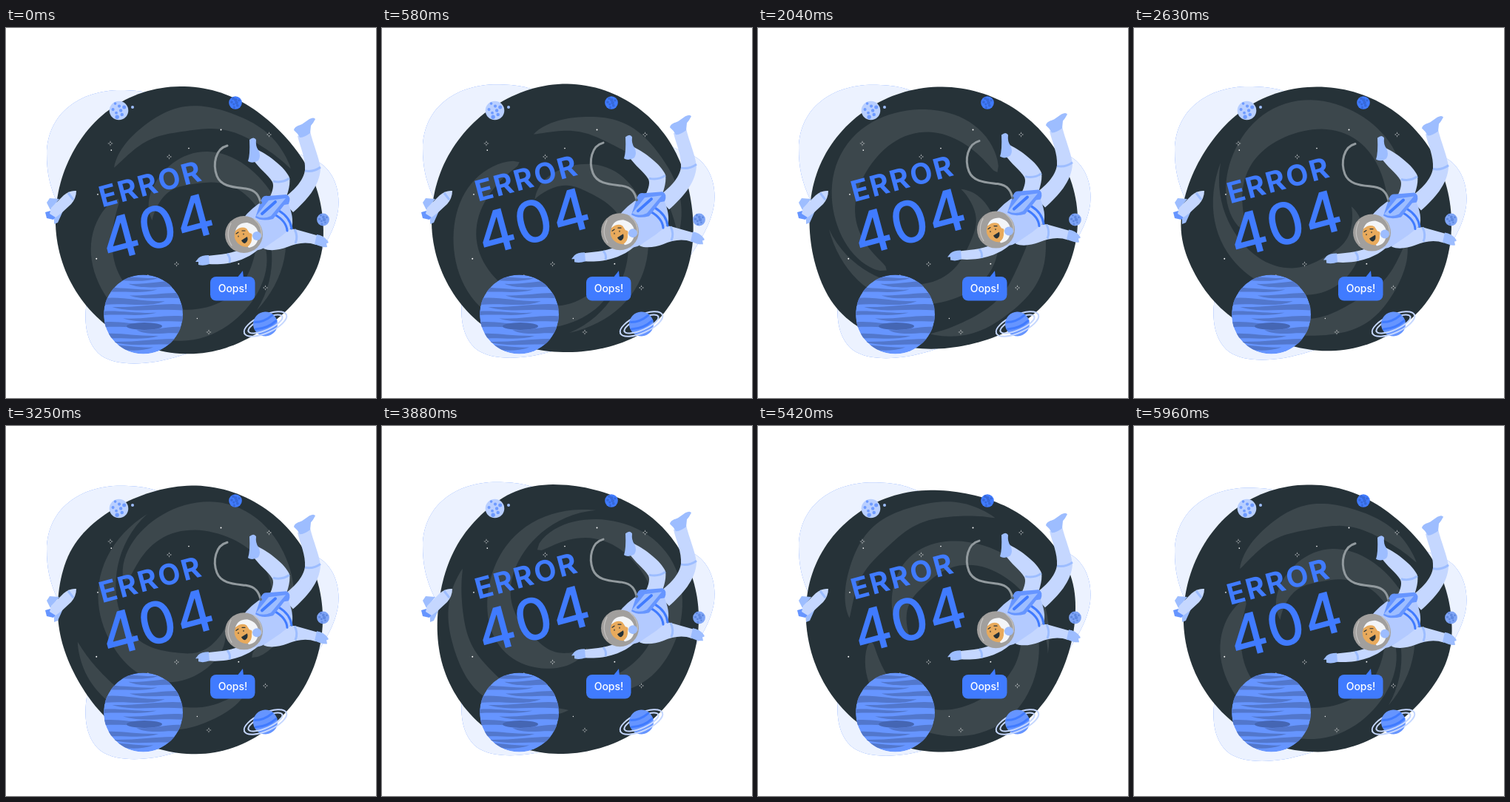
These frames come from a looping animation (500x500 px, 6000 ms). An HTML page:

```html
<!DOCTYPE html>
<html lang="en">
<head>
<meta charset="utf-8">
<title>Error 404</title>
<style>
html, body { margin: 0; width: 100%; height: 100%; overflow: hidden; background: #fff; }
svg { display: block; width: 100vw; height: 100vh; }
text { font-family: Inter, "Open Sans", sans-serif; text-anchor: middle; }
.blue { fill: #407bff; }
.mid { fill: #9dbdff; }
.soft { fill: #b3caff; }
.pale { fill: #c5d7ff; }
.line { fill: none; stroke-linecap: round; }
.band { fill: none; stroke: #9dbdff; stroke-width: 3; }
</style>
</head>
<body>
<svg viewBox="0 0 500 500">
  <defs>
    <path id="cloud" d="M55 170C56 115 100 84 155 84C185 84 198 88 215 95C290 128 370 160 418 179C443 190 452 220 449 245C444 280 420 310 400 340C360 390 290 425 235 443C190 457 150 457 129 443C105 425 106 390 109 370C112 330 85 270 70 238C59 214 55 195 55 170Z"/>
    <clipPath id="disc"><circle cx="185.5" cy="387" r="53.5"/></clipPath>
  </defs>

  <g id="backdrop">
    <use href="#cloud" class="blue"/>
    <use href="#cloud" fill="#fff" opacity=".9"/>
  </g>

  <g id="space">
    <path id="hole" fill="#263238"/>
    <path id="swirls" fill="#fff" opacity=".1"/>
  </g>

  <path id="stars" fill="#fff"/>

  <!-- banded planet -->
  <g clip-path="url(#disc)">
    <circle cx="185.5" cy="387" r="53.5" fill="#6695ff"/>
    <path id="stripes" fill="#5277cc"/>
    <ellipse cx="187" cy="403" rx="24" ry="5" fill="#4566b3"/>
  </g>

  <g id="moons"></g>

  <!-- ringed planet -->
  <g transform="translate(350.5 400) rotate(-24)">
    <g class="line" stroke="#c5d7ff" stroke-width="2">
      <path d="M-31 0A31 12 0 0 1 31 0M-25 0A25 8 0 0 1 25 0"/>
      <circle r="16.5" fill="#6695ff" stroke="none"/>
      <path stroke="#407bff" stroke-width="3" d="M-12 -8Q0 -3 13 -7M-15 1Q0 7 15 2"/>
      <path d="M-31 0A31 12 0 0 0 31 0M-25 0A25 8 0 0 0 25 0"/>
    </g>
  </g>

  <!-- shuttle -->
  <path class="mid" d="M72 231L59 230L55 236L60 246ZM78 245L70 263L65 265L65 252Z"/>
  <path fill="#6695ff" d="M60 247L53 249L55 257L64 259L68 254Z"/>
  <path class="pale" d="M95 220Q86 219 78 226L61 243L59 251L67 256L75 250L88 238Q95 230 95 220Z"/>
  <path class="band" stroke-width="2" d="M84 223L91 232"/>

  <g id="title" class="blue">
    <text transform="translate(199 224) rotate(-15)" font-size="39" font-weight="700" letter-spacing="2.5">ERROR</text>
    <text transform="translate(212 296) rotate(-15)" font-size="78" font-weight="500" letter-spacing="1">404</text>
  </g>

  <g id="astronaut">
    <path class="line" stroke="#929a9e" stroke-width="3" d="M299 159C283 163 279 184 285 200C291 215 309 215 324 217C338 219 342 227 344 236"/>

    <!-- legs -->
    <path class="pale" d="M394 146L411 140C415 157 423 174 425 190C424 214 405 234 388 249L372 232C388 221 402 207 404 192C405 176 398 162 394 146Z"/>
    <path class="mid" d="M389 138C390 133 395 132 400 130L410 123Q416 120 418 123Q415 129 412 132L411 142Q403 148 397 148Q394 142 389 138Z"/>
    <path class="band" d="M404 193Q416 195 425 188"/>
    <path class="pale" d="M341 165C355 172 377 188 383 202C385 214 379 228 375 238L354 234C359 224 363 214 360 208C354 198 342 190 334 178Z"/>
    <path class="mid" d="M329 151Q335 146 338 151Q337 160 341 165Q345 173 341 179Q333 184 327 180Q330 172 329 151Z"/>
    <path class="band" d="M361 207Q373 210 383 203"/>

    <!-- arms -->
    <path class="pale" d="M348 298C358 280 377 270 391 272L423 281L419 293C405 288 393 291 380 296C369 300 357 302 348 298Z"/>
    <path class="mid" d="M420 279Q429 280 435 288Q437 291 433 291L434 296Q428 297 417 292Z"/>
    <path class="band" d="M390 272Q395 282 391 291"/>
    <path class="pale" d="M322 296C308 305 290 306 272 308L274 319C296 321 325 315 342 298Z"/>
    <path class="mid" d="M274 307Q264 307 260 311L256 316L260 316L260 320Q267 322 275 319Z"/>
    <path class="band" d="M299 305Q304 311 302 317"/>

    <!-- torso and pack -->
    <path class="soft" d="M319 259Q331 243 350 232Q370 228 380 234Q390 256 386 270Q371 283 355 293Q344 302 330 301Z"/>
    <path class="line" stroke="#407bff" stroke-width="3" d="M369 247Q384 256 386 271M363 252Q379 261 380 274"/>
    <path fill="#6695ff" d="M345 232Q347 226 354 227L379 225Q386 228 382 238L376 239L361 258Q346 262 337 256Z"/>
    <path class="mid" d="M338 254L355 233L378 230L358 254Q347 259 338 254Z"/>
    <path class="line" stroke="#407bff" stroke-width="4" d="M346 251L364 235"/>
    <circle cx="344" cy="236" r="2" fill="#607080"/>

    <!-- helmet and face -->
    <ellipse cx="321.5" cy="279" rx="25.5" ry="25" fill="#a19f9d"/>
    <path class="line" stroke="#c4c2c0" stroke-width="1.2" d="M304 264Q296 280 305 294M335 258Q347 268 345 282"/>
    <path fill="#f3f5f8" d="M310 274Q313 263 326 263Q342 267 341 282Q340 295 328 297Z"/>
    <path fill="#e8aa5c" d="M310 274Q318 267 325 271L329 277Q334 277 332 283Q333 291 326 296Q315 295 311 288Q307 282 310 274Z"/>
    <path fill="#263238" d="M318 287L326 282Q328 288 323 291Q320 291 318 287Z"/>
    <path class="line" stroke="#263238" stroke-width="1.2" d="M311 278L314 276M319 274L323 274M314 281L314 282M321 278L321 279"/>
    <circle cx="339" cy="281" r="6" class="mid"/>
  </g>

  <rect x="276" y="336" width="60.5" height="32.5" rx="8" class="blue"/>
  <path class="blue" d="M312 338L320 328L321 338Z"/>
  <text x="306.500" y="356.5" font-size="14" font-weight="500" fill="#fff">Oops!</text>
</svg>

<script>
const CX = 247.5, CY = 260, LOOP = 6000, { sin, cos, exp, PI } = Math;
const $ = id => document.getElementById(id);
const setPath = (id, d) => $(id).setAttribute('d', d);
const mix = (a, b, u) => a + (b - a) * u;
const polar = (r, deg) => [CX + r * cos(deg * PI / 180), CY + r * sin(deg * PI / 180)];
const range = n => Array.from({ length: n }, (_, i) => i);

let seed = 7;
const rand = (lo = 0, hi = 1) => {
  seed = seed * 16807 % 2147483647;
  return mix(lo, hi, seed / 2147483647);
};

// Dark shape: a circle with a few soft bumps and dents
function radius(deg) {
  const bump = (at, height, width) => {
    const away = (deg - at + 540) % 360 - 180;
    return height * exp(-((away / width) ** 2));
  };
  return 180.5 + bump(315, -8.5, 31) + bump(238, 4, 30) + bump(17, 4, 16) + bump(57, -2.5, 20);
}
setPath('hole', 'M' + range(180).map(i => polar(radius(2 * i), 2 * i)).join('L') + 'Z');

// Spiral ribbon: angles, radii, bulge of its middle, width, bluntness of its ends
function swirl(a0, a1, r0, r1, bulge, width, blunt) {
  const n = 60;
  const edge = side => range(n + 1).map(i => {
    const u = i / n, arch = Math.max(0, sin(PI * u));
    const half = width / 2 * arch ** blunt * (1 + .12 * sin(14 * u));
    return polar(mix(r0, r1, u) + bulge * arch + side * half, mix(a0, a1, u));
  });
  return 'M' + [...edge(1), ...edge(-1).reverse()].join('L') + 'Z';
}
// All three run the same way round, so that overlaps merge
setPath('swirls',
  swirl(333, 215, 154, 124, 0, 30, .8) +
  swirl(197, 15, 100, 100, 43, 38, .5) +
  swirl(53, -180, 152, 50, -22, 40, 1));

const dot = (x, y, r) => `M${x - r} ${y}a${r} ${r} 0 1 0 ${2 * r} 0a${r} ${r} 0 1 0 ${-2 * r} 0`;
const sparkle = (x, y, r) =>
  `M${x} ${y - r}Q${x} ${y} ${x + r} ${y}Q${x} ${y} ${x} ${y + r}Q${x} ${y} ${x - r} ${y}Q${x} ${y} ${x} ${y - r}` + dot(x, y, 1.6);
const bright = [[141, 156], [220.5, 174], [355.5, 144], [230.5, 319], [350.5, 351], [274, 411]];
const faint = range(10).map(i => polar(rand(60, 160), 36 * i + rand(0, 25)));
setPath('stars', bright.map(p => sparkle(...p, 4)).join('') +
  faint.map(p => dot(...p, rand(.6, 1))).join(''));

// Rows of wavy wedges, alternately from the left and the right
setPath('stripes', range(13).map(i => {
  const y = 339 + 7.8 * i, dir = i % 2 ? -1 : 1, h = rand(5, 9);
  const x = 185.5 - 58 * dir, w = dir * rand(65, 105);
  return `M${x} ${y - h / 2}C${x + w * .3} ${y - h} ${x + w * .6} ${y} ${x + w} ${y - 1}` +
    `C${x + w * .7} ${y + h} ${x + w * .4} ${y} ${x} ${y + h / 2}Z`;
}).join(''));

// Small globe with scattered spots that stay inside its rim
function globe(x, y, r, base, spot) {
  const spots = range(8).map(i => {
    const size = r * rand(.1, .28), a = 2.4 * i, far = (r - size) * Math.sqrt((i + .5) / 8);
    return dot(x + far * cos(a), y + far * sin(a), size);
  });
  $('moons').innerHTML += `<circle cx="${x}" cy="${y}" r="${r}" fill="${base}"/><path fill="${spot}" d="${spots.join('')}"/>`;
}
globe(152.5, 111.5, 12.8, '#b9cfff', '#6f9bff');
globe(310, 101, 8.8, '#407bff', '#3769d9');
globe(428.5, 259, 8.4, '#7ea4f5', '#5f88e0');
$('moons').innerHTML += '<circle cx="171" cy="107" r="2" class="mid"/>';

// Steady rise of 10 and return
const bob = (t, period) => -10 * (1 - Math.abs(1 - 2 * (t % period) / period));
const shift = (id, y) => $(id).setAttribute('transform', `translate(0 ${y})`);

function draw() {
  const t = performance.now() % LOOP;
  $('space').setAttribute('transform', `rotate(${360 * t / LOOP} ${CX} ${CY})`);
  shift('backdrop', bob(t, 1500));
  shift('title', bob(t, 1500));
  shift('astronaut', bob(t, 3000));
  requestAnimationFrame(draw);
}
draw();
</script>
</body>
</html>
```
